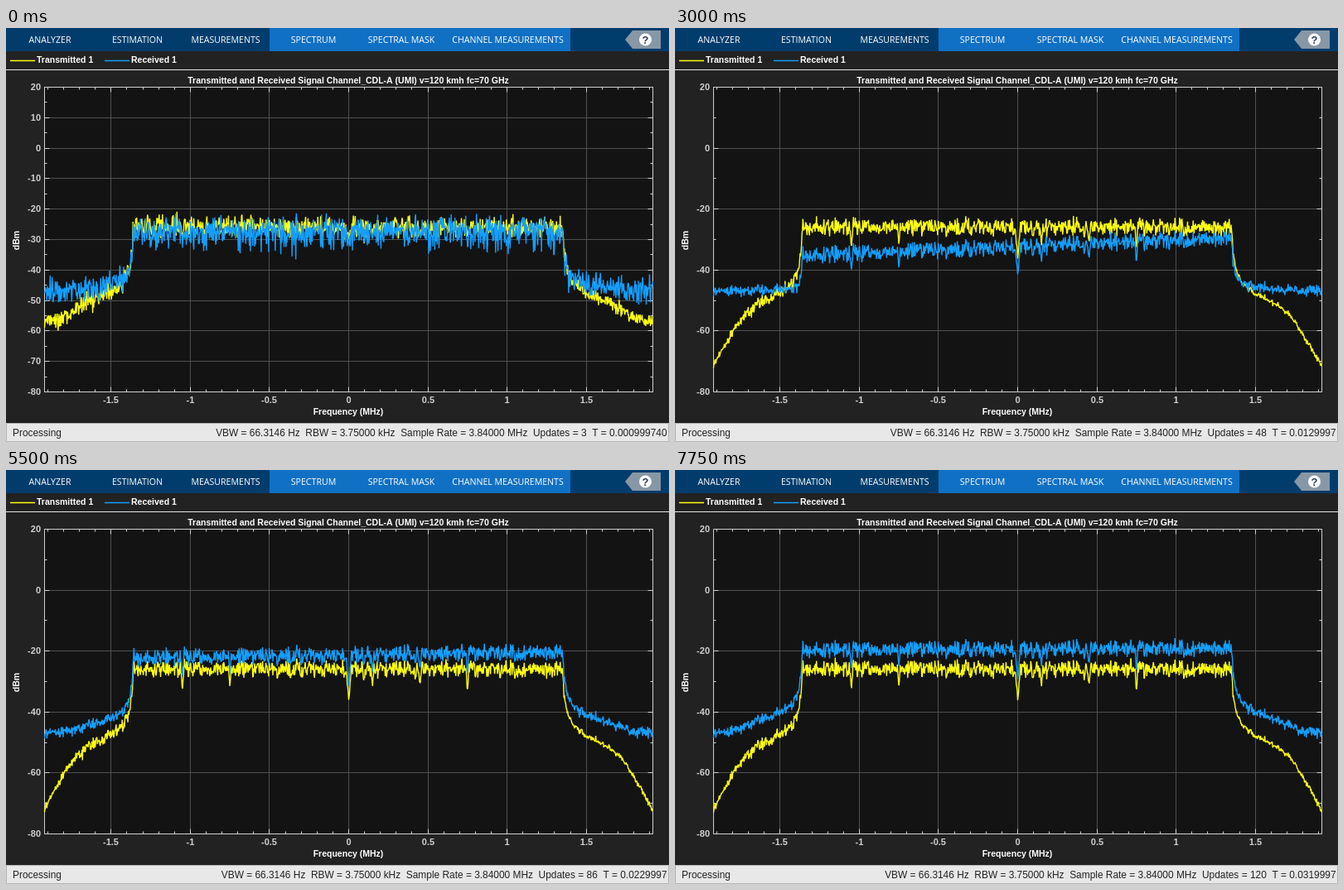
These frames come from a looping animation (800x500 px, 8000 ms). An HTML page with a canvas:

```html
<!DOCTYPE html>
<html lang="en">
<head>
<meta charset="utf-8">
<title>Spectrum analyzer</title>
<style>
html, body { margin: 0; width: 100%; height: 100%; overflow: hidden; background: #222; }
canvas { display: block; }
</style>
</head>
<body>
<canvas id="stage" width="800" height="500"></canvas>
<script>
const ctx = document.getElementById('stage').getContext('2d');
const STEP = 250, STEPS = 32, SAMPLES = 1300, MAX_F = 1.92;
const LEFT = 46.5, RIGHT = 780.5, TOP = 71.5, BOTTOM = 439.5;
const YELLOW = '#ffff11', BLUE = '#139fff';
const SANS = '"Liberation Sans", Arial, sans-serif';

// Transmit mask: |frequency| in MHz, level in dBm
const MASK = [[0, -25.8], [1.355, -25.8], [1.363, -34.5], [1.383, -40], [1.42, -44.3], [1.5, -47.7],
  [1.6, -50.2], [1.68, -52.8], [1.72, -54.8], [1.78, -59], [1.85, -65.5], [1.92, -72.5]];
// Spectral notches: frequency, depth in dB, half width
const NOTCHES = [[-1.05, 8, .009], [-.75, 4.5, .009], [-.45, 3, .009], [0, 10, .016],
  [.15, 6, .009], [.45, 5, .009], [.75, 8, .009], [1.05, 3.5, .009]];
// Channel gain: step, dB at the low band edge, dB at the high band edge
const GAIN = [[0, -1.5, -1], [3, 3, 3], [8, -4, -.8], [12, -9.6, -3.5], [18, 2, 3.2], [26, 5.2, 8], [31, 6.3, 6.9]];

const xOf = f => (LEFT + RIGHT) / 2 + f * (RIGHT - LEFT) / (2 * MAX_F);
const yOf = level => TOP + (20 - level) * (BOTTOM - TOP) / 100;
const toPower = db => 10 ** (db / 10);
const toDb = power => 10 * Math.log10(power);

function interpolate(points, x, column = 1) {
  let i = 1;
  while (i < points.length - 1 && points[i][0] < x) i++;
  const a = points[i - 1], b = points[i];
  return a[column] + (b[column] - a[column]) * (x - a[0]) / (b[0] - a[0]);
}

function random(i, seed) {
  const v = Math.sin(i * 127.1 + seed * 311.7) * 43758.5453;
  return v - Math.floor(v);
}

// Roughly normal noise with unit deviation
const normal = (i, seed) => 2 * (random(i, seed) + random(i, seed + .37) + random(i, seed + .71) - 1.5);

// Averaging makes the noise pattern settle as the step count grows
function noise(i, step, channel) {
  const fresh = 1 / (step + 1) ** .5;
  return normal(i, 100 + (step < 1 ? channel : 0)) * Math.sqrt(1 - fresh * fresh * .8)
    + normal(i, 1 + step + channel * 40) * fresh * .9;
}

function spectrum(step) {
  const n = step + 1, early = 1 / (n * n);
  const floor = toPower(-73) * 39 / n ** 1.75;
  const left = interpolate(GAIN, step, 1), right = interpolate(GAIN, step, 2);
  const sent = [], received = [];
  for (let i = 0; i <= SAMPLES; i++) {
    const f = (2 * i / SAMPLES - 1) * MAX_F, a = Math.abs(f + .004), inBand = a < 1.356;
    let dip = 0;
    for (const [center, depth, width] of NOTCHES)
      dip += depth * Math.max(0, 1 - Math.abs(f - center) / width);
    const calm = dip ? .5 : 1;
    if (!step) dip *= .4;
    const mean = toDb(toPower(interpolate(MASK, a)) + floor) - dip;
    const gain = left + (right - left) * Math.min(1, Math.max(0, (f + 1.35) / 2.7));
    const tail = f > 0 ? .5 : a < 1.72 ? 1.1 : .7;
    const g1 = noise(i, step, 0) * calm, g2 = noise(i, step, 1) * calm;
    const skew = g2 < 0 ? 1 + .4 * early : 1;
    sent.push([f, mean + g1 * (inBand ? 1.35 + .3 * early : tail + .6 * early)]);
    received.push([f, toDb(toPower(mean + gain) + toPower(-46.8))
      + g2 * skew * (inBand ? 1.35 + .9 * early : .9 + .8 * early)]);
  }
  return [sent, received];
}

function box(color, x, y, w, h) {
  ctx.fillStyle = color;
  ctx.fillRect(x, y, w, h);
}

function text(string, x, y, font, color, align = 'center') {
  ctx.font = font;
  ctx.fillStyle = color;
  ctx.textAlign = align;
  ctx.fillText(string, x, y);
}

function line(points, color, width = 1) {
  ctx.beginPath();
  for (const [x, y] of points) ctx.lineTo(x, y);
  ctx.strokeStyle = color;
  ctx.lineWidth = width;
  ctx.stroke();
}

function drawToolbar() {
  box('#003d6d', 0, 0, 800, 28);
  box('#1070c4', 318, 0, 363, 28);
  const tabs = [['ANALYZER', 53], ['ESTIMATION', 158.5], ['MEASUREMENTS', 265], ['SPECTRUM', 371],
    ['SPECTRAL MASK', 477], ['CHANNEL MEASUREMENTS', 605.5]];
  for (const [name, x] of tabs) text(name, x, 18, '500 10.6px "Open Sans", sans-serif', '#fff');
  ctx.beginPath();
  for (const [x, y] of [[747, 14], [756, 3], [790, 3], [790, 25], [756, 25]]) ctx.lineTo(x, y);
  ctx.fillStyle = '#8797a5';
  ctx.fill();
  ctx.beginPath();
  ctx.arc(771.5, 14, 7.5, 0, 7);
  ctx.fillStyle = '#fff';
  ctx.fill();
  text('?', 771.5, 18.5, 'bold 13px ' + SANS, '#26415a');
}

function drawLegend() {
  const font = 'bold 10.5px ' + SANS;
  line([[5, 39.5], [35, 39.5]], YELLOW, 1.5);
  text('Transmitted 1', 37, 42, font, '#fff', 'left');
  line([[119, 39.5], [149, 39.5]], BLUE, 1.5);
  text('Received 1', 151, 42, font, '#fff', 'left');
  line([[0, 50.5], [800, 50.5]], '#e6e6e6');
}

function drawAxes(spacing) {
  const font = 'bold 11px ' + SANS, label = 'bold 10.5px ' + SANS, gray = '#d0d0d0', grid = '#505050';
  box('#131313', LEFT, TOP, RIGHT - LEFT, BOTTOM - TOP);
  const tickX = (x, size) => {
    line([[x, BOTTOM], [x, BOTTOM - size]], gray);
    line([[x, TOP], [x, TOP + size]], gray);
  };
  const tickY = (y, size) => {
    line([[LEFT, y], [LEFT + size, y]], gray);
    line([[RIGHT, y], [RIGHT - size, y]], gray);
  };
  for (let i = -19; i <= 19; i++) {
    const x = Math.floor(xOf(i / 10)) + .5;
    if (i % 5 === 0) {
      line([[x, TOP], [x, BOTTOM]], grid);
      text(i / 10, x, 453, font, gray);
    }
    tickX(x, i % 5 ? 3 : 6);
  }
  for (let level = 20; level >= -80; level -= spacing / 2) {
    const y = Math.floor(yOf(level)) + .5, major = (20 - level) % spacing === 0;
    if (major) {
      line([[LEFT, y], [RIGHT, y]], grid);
      text(level, 42, y + 3.5, font, gray, 'right');
    }
    tickY(y, major ? 6 : 3);
  }
  ctx.strokeStyle = gray;
  ctx.strokeRect(LEFT, TOP, RIGHT - LEFT, BOTTOM - TOP);
  text('Transmitted and Received Signal Channel_CDL-A (UMI) v=120 kmh fc=70 GHz', 413, 67, label, '#fff');
  text('Frequency (MHz)', 413, 467, label, '#fff');
  ctx.save();
  ctx.translate(16, 256.5);
  ctx.rotate(-Math.PI / 2);
  text('dBm', 0, 0, label, '#fff');
  ctx.restore();
}

function drawStatus(step) {
  const font = '11.92px ' + SANS;
  const updates = Math.floor(3.75 * (step + 1));
  const time = (.00099974 + step * .001).toPrecision(6);
  box('#e8e8e8', 0, 477, 800, 23);
  ctx.strokeStyle = '#b4b4b4';
  ctx.lineWidth = 1;
  ctx.strokeRect(.5, 477.5, 799, 22);
  text('Processing', 8, 493, font, '#222', 'left');
  text('VBW = 66.3146 Hz\u00a0 RBW = 3.75000 kHz\u00a0 Sample Rate = 3.84000 MHz\u00a0 Updates = '
    + updates + '\u00a0 T = ' + time, 797.5, 493, font, '#222', 'right');
}

function draw(step) {
  box('#222', 0, 0, 800, 500);
  drawToolbar();
  drawLegend();
  drawAxes(step ? 20 : 10);
  const [sent, received] = spectrum(step);
  const place = ([f, level]) => [xOf(f), yOf(level)];
  ctx.lineJoin = 'bevel';
  line(sent.map(place), YELLOW, 1.4);
  line(received.map(place), BLUE, 1.4);
  drawStatus(step);
}

let shown = -1;
const start = performance.now();
function tick() {
  const step = Math.floor((performance.now() - start) / STEP) % STEPS;
  if (step !== shown) draw(shown = step);
  requestAnimationFrame(tick);
}
tick();
</script>
</body>
</html>
```
